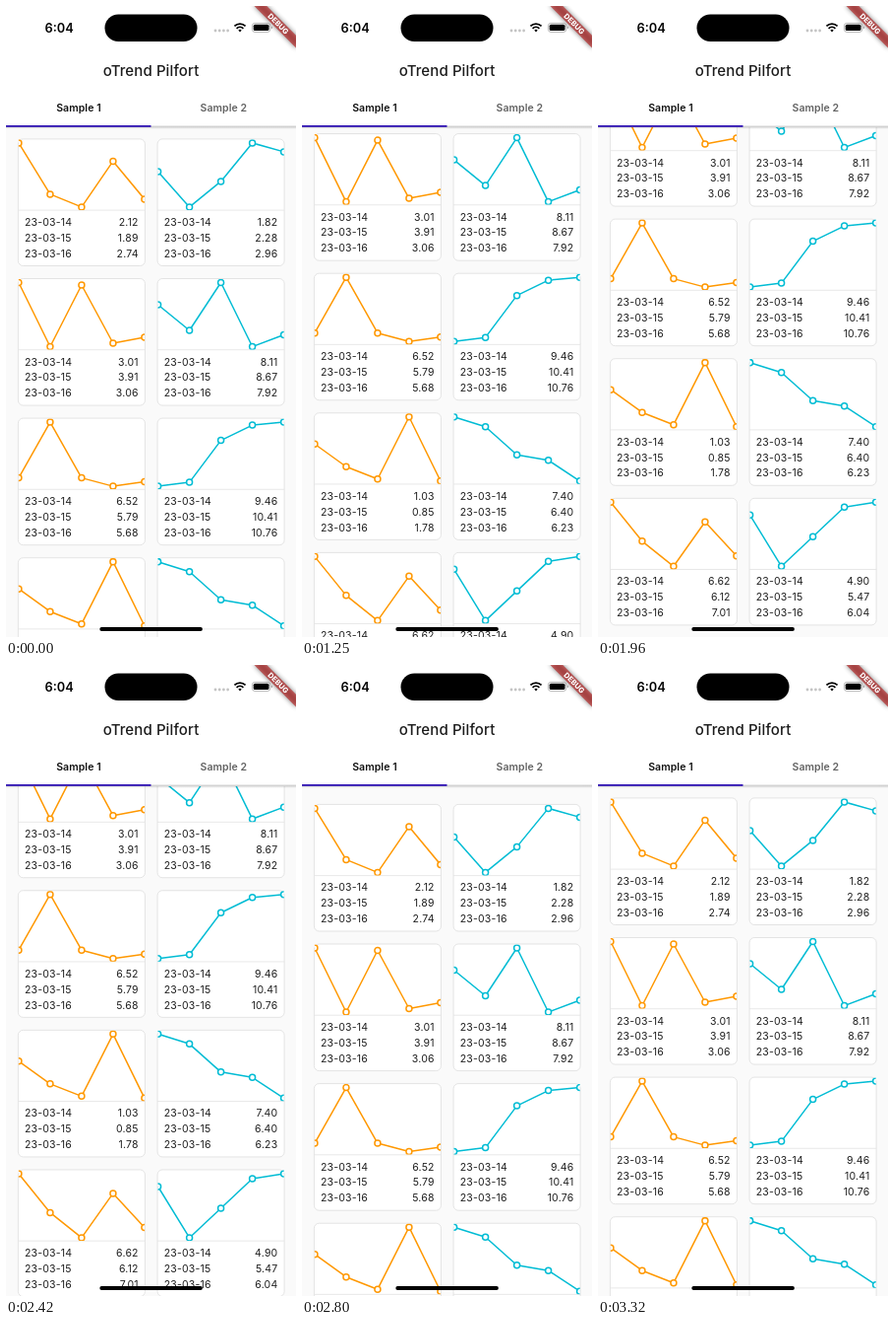
Write an HTML page that moves like this. It is 295 px wide and 640 px high and loops after 3.36 s.

```html
<!DOCTYPE html>
<html lang="en">
<head>
<meta charset="utf-8">
<title>Chart list</title>
<style>
  html, body { margin: 0; width: 100%; height: 100%; overflow: hidden; background: #fff; }
  svg { display: block; width: 295px; height: 640px; font-family: Inter, Roboto, sans-serif; }
  .row { font-size: 10.5px; letter-spacing: .19px; fill: #202020; }
  .tab { font-size: 10.5px; font-weight: 600; letter-spacing: .08px; text-anchor: middle; }
  .end { text-anchor: end; }
</style>
</head>
<body>
<svg viewBox="0 0 295 640">
  <defs>
    <clipPath id="listClip"><rect y="123" width="295" height="517"/></clipPath>
    <clipPath id="chartClip"><rect x=".4" y=".4" width="128.2" height="71.6"/></clipPath>
    <linearGradient id="shade" x2="0" y2="1">
      <stop offset="0" stop-color="#000" stop-opacity=".2"/>
      <stop offset="1" stop-color="#000" stop-opacity="0"/>
    </linearGradient>
  </defs>
  <rect width="295" height="640" fill="#fafafa"/>
  <g clip-path="url(#listClip)"><g id="list"></g></g>

  <rect width="295" height="122" fill="#fff"/>
  <rect y="122" width="295" height="3" fill="url(#shade)"/>
  <rect x="147.5" y="121.5" width="147.5" height="1" fill="#d4d4d4"/>
  <rect y="121" width="147.5" height="1.8" fill="#3014b4"/>
  <text x="147.5" y="70.7" text-anchor="middle" font-size="15" font-weight="500" letter-spacing=".11" fill="#1c1c1c">oTrend Pilfort</text>
  <text class="tab" x="73.9" y="107.4" fill="#111">Sample 1</text>
  <text class="tab" x="221.3" y="107.4" fill="#636363">Sample 2</text>

  <text x="39.6" y="26.6" font-size="12.75" font-weight="600">6:04</text>
  <rect x="100.5" y="8.5" width="94" height="27.6" rx="13.8"/>
  <g fill="#c4c4c4">
    <circle cx="213" cy="25" r="1.4"/><circle cx="217.2" cy="25" r="1.4"/>
    <circle cx="221.4" cy="25" r="1.4"/><circle cx="225.6" cy="25" r="1.4"/>
  </g>
  <g fill="none" stroke="#000" stroke-width="1.8">
    <path d="M232.4 20.4a8 8 0 0 1 11.2 0M234.6 22.8a4.9 4.9 0 0 1 6.8 0"/>
    <path d="M238 26.4l-1.7-1.8a2.4 2.4 0 0 1 3.4 0z" fill="#000" stroke="none"/>
  </g>
  <rect x="250.4" y="17.4" width="18.4" height="9" rx="2.7" fill="none" stroke="#a5a5a5" stroke-width=".8"/>
  <rect x="251.7" y="18.7" width="15.8" height="6.4" rx="1.6"/>
  <path d="M269.8 20.5v2.8q1.2-.4 1.2-1.4t-1.2-1.4" fill="#a5a5a5"/>

  <g transform="translate(295 0) rotate(45)">
    <rect x="-30" y="21" width="60" height="9" fill-opacity=".5" style="filter: blur(2.8px)"/>
    <rect x="-30" y="21" width="60" height="9" fill="#b71c1c" fill-opacity=".63"/>
    <text y="28.2" text-anchor="middle" font-size="7.5" font-weight="800" fill="#fff">DEBUG</text>
  </g>
  <rect x="95.3" y="630" width="104.6" height="3.9" rx="1.95"/>
</svg>
<script>
const LOOP = 3360, MAX_SCROLL = 202, DECAY = 285;
const TOP = 134.9, PITCH = 141.6;
const ORANGE = '#ff9800', CYAN = '#00bcd4';
const list = document.getElementById('list');

// Each card: heights of five points, then three values.
const rows = [
  [[[4, 56, 69, 22.5, 61], '2.12 1.89 2.74'], [[33, 69, 43, 4, 13], '1.82 2.28 2.96']],
  [[[4, 69, 6.5, 65.5, 59.5], '3.01 3.91 3.06'], [[26.5, 52.5, 4, 69, 57], '8.11 8.67 7.92']],
  [[[60.5, 4, 60.5, 69, 64.5], '6.52 5.79 5.68'], [[69, 65, 22.5, 7, 4], '9.46 10.41 10.76']],
  [[[31.5, 54.5, 67, 4, 69], '1.03 0.85 1.78'], [[4, 14, 42.5, 48, 69], '7.40 6.40 6.23']],
  [[[4, 43.5, 69, 24, 58.5], '6.62 6.12 7.01'], [[17, 69, 39, 9, 4], '4.90 5.47 6.04']]
];

function card(x, y, heights, values, color) {
  const points = heights.map((h, i) => [.5 + i * 32, h]);
  const dots = points.map(([cx, cy]) => `<circle cx="${cx}" cy="${cy}" r="3"/>`).join('');
  const lines = values.split(' ').map((value, i) => {
    const base = 88 + i * 15.9;
    return `<text class="row" x="6.6" y="${base}">23-03-${14 + i}</text>` +
      `<text class="row end" x="122.3" y="${base}">${value}</text>`;
  }).join('');
  return `<g transform="translate(${x} ${y})">
    <rect width="129" height="128.6" rx="5" fill="#fff" stroke="#dedede" stroke-width=".8"/>
    <path d="M0 72.2h129" stroke="#e2e2e2" stroke-width=".8"/>
    <g clip-path="url(#chartClip)" fill="#fff" stroke="${color}" stroke-width="1.5">
      <polyline points="${points.join(' ')}" fill="none" stroke-linejoin="round"/>${dots}
    </g>${lines}</g>`;
}

list.innerHTML = rows.map(([left, right], i) => {
  const y = TOP + i * PITCH;
  return card(12.4, y, ...left, ORANGE) + card(154.1, y, ...right, CYAN);
}).join('');

// The screen refreshes only at these moments.
const refreshes = [0, 1030, 1100, 1180, 1250, 1330, 1400, 1570, 1720, 1800, 1880, 1960,
  2420, 2500, 2570, 2650, 2720, 2800, 2880, 2950, 3020, 3100, 3170, 3250, 3320];

function fling(t, start, end, from, to) {
  const u = (t - start) / (end - start);
  return from + (to - from) * u * u * (3 - 2 * u);
}

const settle = (t, start, amount) => amount * Math.exp((start - t) / DECAY);

function scrollAt(t) {
  if (t < 1030 || t >= 3320) return 0;
  if (t < 1400) return fling(t, 990, 1400, 0, MAX_SCROLL + 9);
  if (t < 1960) return MAX_SCROLL + settle(t, 1400, 9);
  if (t < 2420) return MAX_SCROLL;
  if (t < 2650) return fling(t, 2380, 2650, MAX_SCROLL, -11);
  return -settle(t, 2650, 11);
}

function draw(t) {
  const shown = refreshes.filter(r => r <= t).pop();
  list.setAttribute('transform', `translate(0 ${-scrollAt(shown)})`);
}

let begin;
function tick(now) {
  begin ??= now;
  draw((now - begin) % LOOP);
  requestAnimationFrame(tick);
}
draw(0);
requestAnimationFrame(tick);
</script>
</body>
</html>
```
